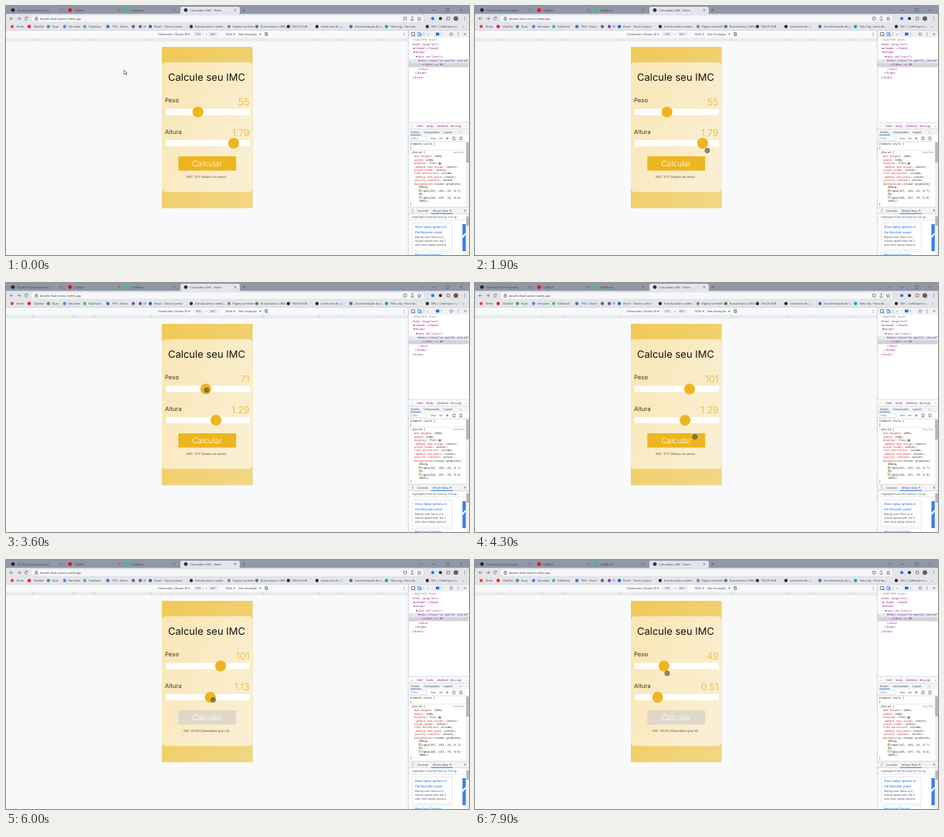
An HTML page that plays this animation: 600 by 323 pixels, repeating every 8 s.

```html
<!DOCTYPE html>
<html lang="pt">
<head>
<meta charset="utf-8">
<title>Calculadora IMC</title>
<style>
html, body { margin: 0; width: 100%; height: 100%; overflow: hidden; background: #fff; }
svg { display: block; width: 600px; height: 323px; }
text { font: 3.7px "Open Sans", "Noto Sans", sans-serif; fill: #3c4043; white-space: pre; text-rendering: geometricPrecision; }
.code { font: 3.65px "Liberation Mono", "DejaVu Sans Mono", monospace; fill: #222; }
.tag { fill: #881280; }
.prop { fill: #c5221f; }
.dim { fill: #777; }
.card { font: 3.8px Roboto, sans-serif; fill: #5f6368; }
.card.blue { font-size: 4.25px; fill: #1a73e8; }
.app text { font-family: Inter, "Open Sans", sans-serif; fill: #3a342a; }
.app .title { font-size: 13px; fill: #15130f; }
.app .label { font-size: 7.7px; }
.app .value { font-size: 12.5px; font-weight: 300; fill: #ecb420; text-anchor: end; }
.app .action { font-size: 10.2px; font-weight: 300; fill: #fff; text-anchor: middle; }
.app .result { font-size: 4px; fill: #5c5340; text-anchor: middle; }
.line { fill: none; stroke: #5f6368; stroke-width: .7; }
</style>
</head>
<body>
<svg viewBox="0 0 600 323">
  <defs>
    <linearGradient id="screen" x2="1" y2="1"><stop stop-color="#f1c958"/><stop offset="1" stop-color="#f1d684"/></linearGradient>
    <linearGradient id="panel" x2="1" y2=".6"><stop stop-color="#f9e6b4"/><stop offset="1" stop-color="#faefd2"/></linearGradient>
  </defs>

  <rect width="600" height="323" fill="#f8f9fa"/>
  <g id="chrome"></g>

  <g class="app">
    <rect x="202" y="53" width="117.7" height="209.3" fill="url(#screen)"/>
    <rect x="202" y="73" width="117.5" height="168.2" rx="5" fill="url(#panel)"/>
    <text class="title" x="210" y="96.6">Calcule seu IMC</text>
    <text class="label" x="206" y="125">Peso</text>
    <text class="value" id="peso" x="315.6" y="128.7">55</text>
    <text class="label" x="206" y="165.5">Altura</text>
    <text class="value" id="altura" x="315.6" y="168.7">1.79</text>
    <path d="M207 133.5h109v8h-109zM207 174h109v8h-109z" fill="#fff"/>
    <circle id="pesoThumb" cy="137.5" r="7.1" fill="#edb51f"/>
    <circle id="alturaThumb" cy="178" r="7.1" fill="#edb51f"/>
    <rect id="button" x="223.3" y="195" width="75" height="18.5" rx="1"/>
    <text class="action" x="260.5" y="208">Calcular</text>
    <text class="result" id="result" x="260.3" y="222.8"></text>
  </g>

  <circle id="touch" r="3.2" fill="#55524c" fill-opacity=".68" stroke="#55524c" stroke-opacity=".7" stroke-width=".6"/>
  <path id="arrow" d="M0 0v5.6l1.4-1.2 1 2 .9-.4-.9-1.9h1.7z" fill="#fff" stroke="#222" stroke-width=".55"/>
</svg>
<script>
const $ = id => document.getElementById(id);
const esc = s => s.replace(/&/g, '&amp;').replace(/</g, '&lt;');
const text = (x, y, s, cls = '') => `<text x="${x}" y="${y}" class="${cls}">${esc(s)}</text>`;
const rect = (x, y, w, h, fill, extra = '') => `<rect x="${x}" y="${y}" width="${w}" height="${h}" fill="${fill}" ${extra}/>`;
const dot = (x, y, fill, r = 2) => `<circle cx="${x}" cy="${y}" r="${r}" fill="${fill}"/>`;
const line = (d, extra = '') => `<path class="line" d="${d}" ${extra}/>`;
const caret = (x, y) => `<path d="M${x} ${y}h2.6l-1.3 1.8z" fill="#5f6368"/>`;
const cross = (x, y, r = 1.3) => line(`M${x - r} ${y - r}l${2 * r} ${2 * r}m0 ${-2 * r}l${-2 * r} ${2 * r}`);
const more = (x, y) => [0, 1.7, 3.4].map(d => dot(x, y + d, '#5f6368', .5)).join('');

function browser() {
  const bar = '#e3e5ea';
  let s = rect(0, 0, 600, 10.5, '#8f97a8') + rect(226, 1, 77, 10, bar, 'rx="2"');
  const tabs = [
    [6, '#24292f', 'Tarvinov (Tarvino Junior)', 71],
    [80, '#f00', 'ClipMur', 146],
    [154, '#25d366', 'FalaNuvo', 218],
    [230, '#333', 'Calculadora IMC - React', 297]
  ];
  for (const [x, color, name, end] of tabs) {
    s += dot(x + 3, 5.3, color, 2.4) + text(x + 8.5, 6.7, name) + cross(end, 5.3);
  }
  s += line('M75 3v5M150 3v5', 'opacity=".5"') + line('M306 5.3h4m-2-2v4');
  s += line('M536.5 4.5l1.7 1.7 1.7-1.7M552 5.5h4M570.5 3.5h3.6v3.6h-3.6z') + cross(589.5, 5.3, 1.8);

  s += rect(0, 10.5, 600, 21.5, bar);
  s += line('M9.5 16.3h-4.5l1.9-1.9m-1.9 1.9l1.9 1.9M14.5 16.3h4.5l-1.9-1.9m1.9 1.9l-1.9 1.9M27.8 15a2 2 0 1 0 .1 2.4m0-3.4v1.5h-1.5');
  s += rect(33, 12.2, 508, 8.3, '#f6f7f9', 'rx="4.1"');
  s += line('M37.8 16h3v2.4h-3zm.6 0v-1a.9.9 0 0 1 1.8 0v1');
  s += text(44, 17.8, 'desafio-final-tarvino.netlify.app');
  s += line('M515.5 14.5h3.5v3.5h-3.5zM525 16.5v2h3v-2m-1.5 0v-3m-1 1l1-1 1 1M535.5 14l.8 1.6 1.7.2-1.2 1.2.3 1.7-1.6-.8-1.5.8.3-1.7-1.3-1.2 1.8-.2z');
  s += dot(553, 16.3, '#1a73e8') + dot(563, 16.3, '#222') + line('M571.5 14.5h3.5v3.5h-3.5z');
  s += dot(583, 16.3, '#6f5a50', 3) + more(594.5, 14.6);

  const marks = [
    [8, 14, '#ea4335', 'Brelo'], [30, 36, '#f00', 'ClipMur'], [55, 60, '#34a853', 'Ruas'],
    [76, 81, '#4285f4', 'Versador'], [102, 107, '#25d366', 'FalaNuvo'], [132, 138, '#2878c8', 'PRV - Aluno'],
    [165, 170, '#666', ''], [174, 178, '#7b4bb5', 'SF'], [187, 192, '#0a66c2', 'Email – Tarvino Junior'],
    [240, 245, '#222', 'Estruturando o webs...'], [289, 293.5, '#888', 'Pagery Lomenth'],
    [325, 330, '#3b8a4b', 'Busca básica: ORVI...'], [366, 370.5, '#222', 'TRUVE HUB'],
    [403, 408, '#222', 'construtor.dv |...'], [447, 452, '#3572b0', 'Documentação do c...'],
    [493, 498, '#00a5a8', 'Trelu.org - Hora do...'], [546, 551, '#222', 'VEK | Codifique o s...']
  ];
  for (const [ix, tx, color, name] of marks) s += dot(ix, 26.7, color, 2.1) + text(tx, 28, name);
  return s + text(592, 28, '»') + line('M0 32h600', 'stroke-opacity=".25"');
}

function deviceBar() {
  let s = rect(0, 32, 521, 9.5, '#f8f9fb');
  s += text(197, 38, 'Dimensões: Olvane SE') + caret(236, 36);
  s += rect(243, 33.5, 14, 6, '#eceef1') + rect(262, 33.5, 14, 6, '#eceef1');
  s += text(246, 38, '375') + text(258.4, 38, '×') + text(265, 38, '667');
  s += text(284, 38, '100%') + caret(294.5, 36) + text(301, 38, 'Sem limitação') + caret(328, 36);
  s += line('M336 34.5h2.6v4h-2.6zM335 35.5l4.6 2') + more(516, 35);
  s += rect(0, 41.5, 521, 4.5, '#e8eaed');
  return s + line('M35 41.5v4.5M87 41.5v4.5M115 41.5v4.5M188 41.5v4.5M333 41.5v4.5M406 41.5v4.5M434 41.5v4.5M486 41.5v4.5', 'stroke-opacity=".2"');
}

function inspector() {
  let s = rect(521, 32, 79, 291, '#fff') + rect(521, 32, 79, 9, '#eff1f4') + line('M521.3 32v291', 'stroke-opacity=".4"');
  s += line('M525.5 34.5h4v4h-4zM528 37l2.5 2.5') + line('M534 34.3h2.4v4.4h-2.4zm2.4 1.4h1.8v3h-1.8', 'style="stroke:#1a73e8"');
  s += line('M541.5 34v5', 'opacity=".4"') + text(546, 38, '»') + rect(557, 34.5, 4.5, 3.8, '#1a73e8', 'rx=".7"') + text(563, 38, '1');
  s += '<circle class="line" cx="577" cy="36.5" r="1.7"/>' + cross(595, 36.5) + more(586, 34.8);

  s += rect(521.5, 69, 78, 5.2, '#e3e8f1') + rect(521.5, 74.2, 78, 5.2, '#d2d3d6') + text(522.5, 72.5, '…', 'code');
  const tree = [
    [526, '<!DOCTYPE html>'], [526, '<html lang="en">'], [528, '▶<head>…</head>'], [528, '▼<body>'],
    [531, '▼<div id="root">'], [534, '▼<div class="sc-gsnTZi jIurid">'], [538, '…</div> == $0'],
    [534, '</div>'], [530, '</body>'], [526, '</html>']
  ];
  tree.forEach(([x, row], i) => s += text(x, 45.2 + i * 5.38, row, 'code ' + (i ? 'tag' : 'dim')));

  s += rect(521.5, 151, 78.5, 8.5, '#f8f9fa') + line('M521 151h79M521 159.5h79', 'stroke-opacity=".3"');
  s += text(524, 156.5, '…') + text(532.5, 156.5, 'html', 'tag') + text(545, 156.5, 'body', 'tag');
  s += text(558.5, 156.5, 'div#root', 'tag') + text(576, 156.5, 'div.sc-gs', 'tag') + text(596, 156.5, '›');
  s += rect(521.5, 159.8, 78.5, 7.7, '#f1f3f4') + rect(524, 166.8, 14, .9, '#1a73e8');
  s += text(525, 164.8, 'Estilos') + text(541.5, 164.8, 'Computado') + text(567, 164.8, 'Layout') + text(588, 164.8, '»');
  s += rect(523.5, 169, 22, 5.5, '#fff', 'stroke="#ccc" stroke-width=".5"') + text(525, 173, 'Filtro', 'dim');
  s += text(550, 173, ':hov') + text(560.5, 173, '.cls') + line('M570 171.8h3.6m-1.8-1.8v3.6M579 170h3v3.6h-3zM588 170h3v3.6h-3z');
  s += line('M521 176h79', 'stroke-opacity=".3"');

  s += text(523.5, 180.2, 'element.style {', 'code') + text(523.5, 185.3, '}', 'code') + line('M521 187h79', 'stroke-opacity=".2"');
  s += text(523.5, 191.4, '.jIurid {', 'code') + text(579, 191.4, '<style>', 'code dim');
  const rules = ['min-height: 100%', 'width: 100%', 'display: flex', '-webkit-box-align: center', 'align-items: center',
    'flex-direction: column', '-webkit-box-pack: center', 'justify-content: center'];
  rules.forEach((rule, i) => {
    const [name, value] = rule.split(':');
    s += `<text class="code" x="529" y="${196.2 + i * 4.45}"><tspan class="prop">${name}</tspan>:${value};</text>`;
  });
  s += rect(560.5, 202.7, 3.2, 3, '#888');
  s += '<text class="code" x="529" y="231.8"><tspan class="prop">background</tspan>:▸linear-gradient(</text>';
  const stops = [[535, '90deg,'], [539, 'rgba(247, 183, 24, 0.7)'], [535, '0%,'], [539, 'rgba(245, 197, 70, 0.6)'], [535, '100%);'], [523.5, '}']];
  stops.forEach(([x, row], i) => s += text(x, 236.3 + i * 4.42, row, 'code'));
  s += rect(535, 238, 3, 3, '#f9cc5c', 'stroke="#777" stroke-width=".3"') + rect(535, 246.8, 3, 3, '#f9dc90', 'stroke="#777" stroke-width=".3"');
  s += rect(596, 176.5, 4, 84, '#f1f1f1') + rect(596.3, 177, 3.4, 26, '#b4b4b4');

  s += rect(521.5, 261, 78.5, 8.5, '#f1f3f4') + line('M521 261h79M521 269.5h79', 'stroke-opacity=".3"') + more(527, 263.5);
  s += text(533, 266.7, 'Console') + text(553, 266.7, "What's New") + cross(576, 265.4, 1.1) + cross(595, 265.4) + rect(551, 268.8, 28, .9, '#1a73e8');
  s += text(526, 274.8, 'Highlights from the Quorva 104 up...', 'card') + line('M521 277.5h79', 'stroke-opacity=".2"');
  const border = 'rx="1" stroke="#d5d8dc" stroke-width=".6"';
  s += rect(526.5, 281.5, 51.5, 34.5, '#fff', border) + rect(526.5, 318.3, 51.5, 10, '#fff', border);
  s += text(530, 287.5, 'Slow replay options in', 'card blue') + text(530, 294.6, 'the Recorder panel', 'card blue');
  ['Replay user flows at a', 'slower speed with the 3', 'new slow replay options.'].forEach((row, i) => s += text(530, 300.6 + i * 5.3, row, 'card'));
  s += text(530, 323.6, 'New User Timings', 'card blue');
  s += rect(591.5, 283, 4.3, 35, '#3b7ded') + '<path d="M591.5 298l4.3-4v2.5l-4.3 5z" fill="#fff"/>';
  return s + rect(596.3, 270, 3.7, 53, '#f1f1f1') + rect(596.5, 273, 3.3, 12, '#b4b4b4');
}

$('chrome').innerHTML = browser() + deviceBar() + inspector();

// time, x, y
const path = [
  [0, 153, 83], [300, 153, 83], [1000, 240, 150], [1500, 299, 190], [1900, 301, 187.5], [2100, 301, 187.5],
  [2300, 295, 178], [2800, 272, 176], [3000, 270, 173], [3400, 250, 139], [3900, 279, 139],
  [4300, 285, 199.5], [4700, 284, 206], [5000, 287, 217], [5200, 289, 220], [5700, 276, 180],
  [6600, 246, 185.5], [6800, 241, 182], [7300, 282, 141], [7900, 249, 147]
];
const weight = [[3400, 55], [3900, 101], [7300, 101], [7900, 49]];
const height = [[2300, 1.79], [2800, 1.29], [5700, 1.29], [6600, .63], [6800, .51]];

function at(keys, t, col = 1) {
  const i = keys.findIndex(k => k[0] > t);
  if (i < 0) return keys[keys.length - 1][col];
  if (!i) return keys[0][col];
  const a = keys[i - 1], b = keys[i];
  const u = (t - a[0]) / (b[0] - a[0]);
  return a[col] + (b[col] - a[col]) * (1 - Math.cos(Math.PI * u)) / 2;
}

const LOOP = 8000, STEP = 100, CLICK = 4700;
const holds = { 1600: 1500, 2000: 1900, 4800: 4700, 4900: 4700, 7800: 7700 };

function draw(time) {
  const step = Math.floor(time % LOOP / STEP) * STEP;
  const t = holds[step] ?? step;
  const kg = Math.round(at(weight, t)), m = at(height, t);
  $('peso').textContent = kg;
  $('altura').textContent = m.toFixed(2);
  $('pesoThumb').setAttribute('cx', 213.5 + kg * .64);
  $('alturaThumb').setAttribute('cx', 213.5 + m * 45.5);

  const done = t >= CLICK;
  $('button').setAttribute('fill', done ? '#dfd8ca' : '#edb51f');
  $('result').textContent = done ? 'IMC: 60.69 (Obesidade grau III).' : 'IMC: 17.17 (Abaixo do peso).';

  const x = at(path, t, 1), y = at(path, t, 2), inside = x > 202;
  for (const [id, on] of [['touch', inside], ['arrow', !inside]]) {
    $(id).setAttribute('transform', `translate(${x} ${y})`);
    $(id).style.display = on ? '' : 'none';
  }
}

const start = performance.now();
function loop(now) {
  draw(Math.max(0, now - start));
  requestAnimationFrame(loop);
}
loop(start);
</script>
</body>
</html>
```
